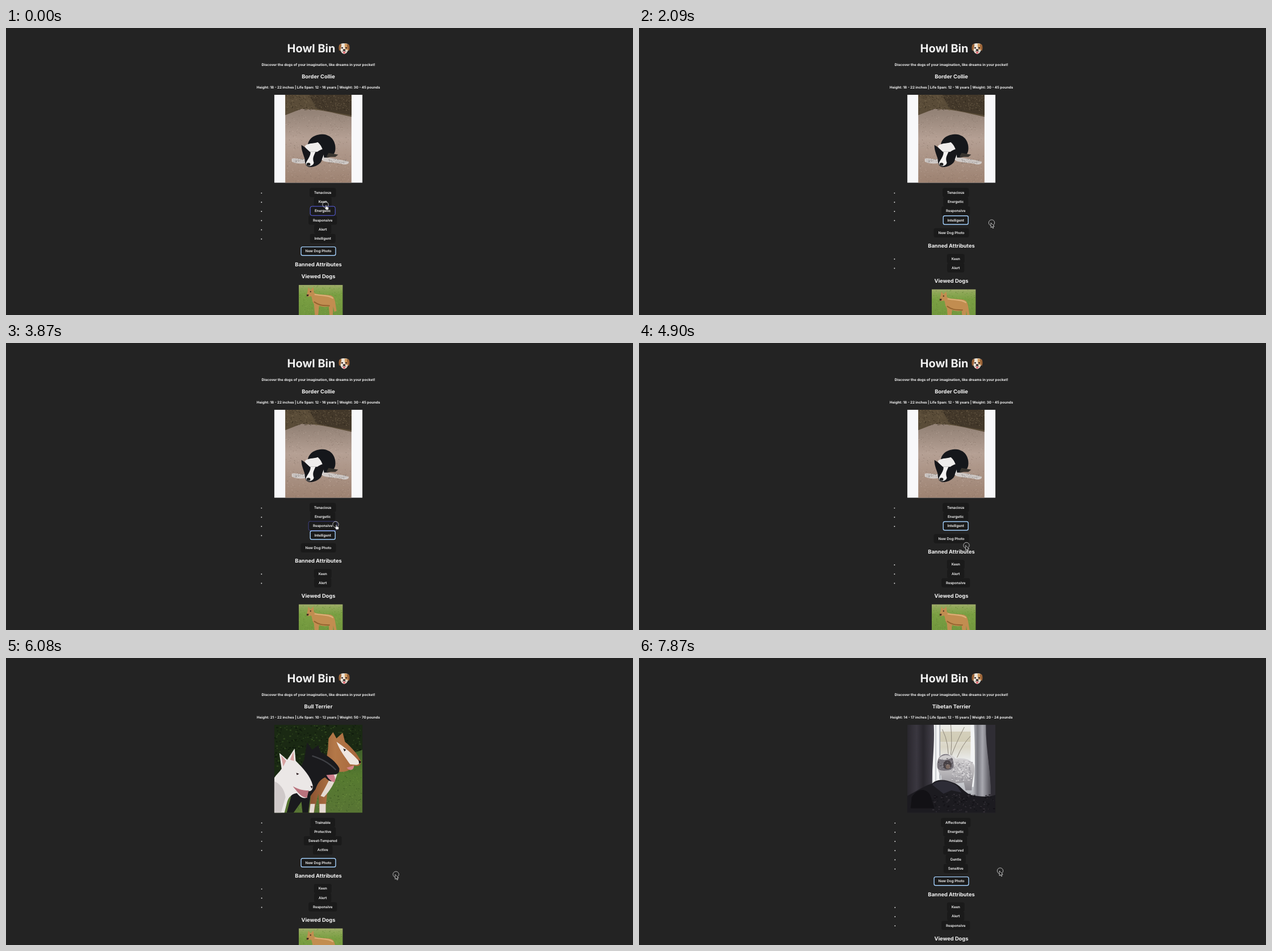
Animation, 1105 px wide and 507 px high, one loop 8000 ms. Source, as an HTML page:

```html
<!DOCTYPE html>
<html lang="en">
<head>
<meta charset="utf-8">
<title>Howl Bin</title>
<style>
  html, body { margin: 0; width: 100%; height: 100%; overflow: hidden; background: #232323; }
  svg { display: block; }
  text {
    font-family: Inter, "Open Sans", sans-serif; font-weight: 700; fill: #f3f3f3;
    text-anchor: middle; text-rendering: geometricPrecision;
  }
  .label { font-weight: 500; stroke: #f3f3f3; stroke-width: .12; }
</style>
</head>
<body>
<svg id="stage" width="1105" height="507" viewBox="0 0 1105 507">
  <defs>
    <linearGradient id="road" x2="0" y2="1">
      <stop offset=".2" stop-color="#948377"/><stop offset=".5" stop-color="#b5a094"/><stop offset="1" stop-color="#9d8271"/>
    </linearGradient>
    <linearGradient id="view" x2="0" y2="1">
      <stop stop-color="#ecece8"/><stop offset=".3" stop-color="#dad6c6"/><stop offset=".5" stop-color="#eceef0"/><stop offset="1" stop-color="#aeb0b6"/>
    </linearGradient>
    <linearGradient id="drape">
      <stop stop-color="#29272d"/><stop offset=".35" stop-color="#3a3740"/><stop offset=".6" stop-color="#28262c"/><stop offset="1" stop-color="#45424c"/>
    </linearGradient>
    <linearGradient id="sheer">
      <stop stop-color="#c9cace"/><stop offset=".3" stop-color="#77777f"/><stop offset=".55" stop-color="#a9a9b0"/><stop offset="1" stop-color="#4a4850"/>
    </linearGradient>
    <linearGradient id="coat" x2="0" y2="1">
      <stop stop-color="#dcdadb"/><stop offset=".5" stop-color="#b9b7ba"/><stop offset="1" stop-color="#8a888e"/>
    </linearGradient>
    <linearGradient id="lawn" x2="0" y2="1">
      <stop stop-color="#40602a"/><stop offset=".4" stop-color="#567a30"/><stop offset="1" stop-color="#587434"/>
    </linearGradient>
    <linearGradient id="tan">
      <stop stop-color="#8a5230"/><stop offset=".5" stop-color="#b47848"/><stop offset="1" stop-color="#a5643a"/>
    </linearGradient>
    <linearGradient id="field" x2="0" y2="1">
      <stop stop-color="#a0ab6b"/><stop offset=".12" stop-color="#8da756"/><stop offset=".3" stop-color="#7a9f43"/><stop offset="1" stop-color="#6f953c"/>
    </linearGradient>

    <symbol id="collie" viewBox="0 0 156 156">
      <rect width="156" height="156" fill="#f8f8fa"/>
      <rect x="19.5" width="117" height="156" fill="url(#road)"/>
      <g data-specks="20 36 115 119 620 #79655a #c9b5a9 .9"/>
      <path d="M19.5 0H136.5V39C112 34 92 28 70 26L48 25 19.5 36z" fill="#5a4c38"/>
      <path d="M62 0H136.5V36C112 32 88 28 74 24z" fill="#43382a"/>
      <g data-specks="20 0 115 27 380 #2a2318 #7d6d53 1.3"/>
      <path d="M59 92C59 77 72 70 86 70 101 71 109 83 108 97 107 106 102 110 94 111L66 112C60 106 59 98 59 92z" fill="#15171b"/>
      <path d="M96 103 113 106 108 110 92 110z" fill="#38342f"/>
      <path d="M54 91C60 85 68 87 77 84 85 91 88 101 88 116L64 112z" fill="#eeeceb"/>
      <path d="M86 111C100 111 121 116 131 118 134 122 126 125 118 122 106 120 95 120 86 117zM31 113C38 111 46 115 54 114L56 121C44 123 34 121 31 118z" fill="#d0cac7"/>
      <g data-specks="33 113 20 6 40 #45413f #777 .9"/>
      <g data-specks="96 114 32 7 60 #45413f #777 .9"/>
      <path d="M48 89C54 92 58 97 63 101L76 101C82 97 87 95 89 97 89 106 85 110 84 116 82 123 72 128 64 128 56 128 54 122 54 114 52 106 48 100 48 89z" fill="#16171b"/>
      <path d="M64 101 73 101C70 108 67 112 70 120 69 128 55 128 56 121 59 114 65 108 64 101z" fill="#f3f1f0"/>
      <ellipse cx="60.5" cy="123" rx="3.4" ry="2.6" fill="#222"/>
    </symbol>

    <symbol id="bull" viewBox="0 0 156 156">
      <rect width="156" height="156" fill="#1a2913"/>
      <g data-specks="0 0 152 72 420 #3a5522 #0c140a 2.4"/>
      <path d="M0 156V120L88 62C110 50 132 54 156 44V156z" fill="url(#lawn)"/>
      <g data-specks="20 62 134 92 520 #6f9240 #36521f 1.4"/>
      <path d="M95 42 96 24 104 13 110 24 121 14 125 30C137 40 148 53 153 64 154 72 148 75 140 72 133 84 121 84 112 83L104 104 94 118 90 156H80L78 122 70 156H62L66 110 92 62z" fill="url(#tan)"/>
      <path d="M110 30C122 38 140 52 151 66 150 74 140 70 134 70 126 58 116 46 110 30z" fill="#efe6e0"/>
      <path d="M104 84 112 84C108 102 98 118 88 128L82 126C90 112 96 100 104 84zM80 140H91V156H80zM64 140H72L70 156H62z" fill="#e5dad2"/>
      <path d="M128 76 141 72C141 80 134 83 128 76z" fill="#d58286"/>
      <path d="M149 62 154 66 150 69zM122 42l5 2-3 3z" fill="#1a1517"/>
      <path d="M53 62 58 31 67 44 78 36 82 48C97 56 110 66 115 77 116 86 111 88 105 88L106 98C99 103 94 97 90 93 81 97 77 103 73 114L64 126 60 156H50L48 136 34 156H22L40 88z" fill="#1a1a1d"/>
      <path d="M67 55C82 60 96 66 109 80" fill="none" stroke="#3f4045" stroke-width="2.4"/>
      <path d="M92 89 105 88Q110 98 106 102 98 100 92 89z" fill="#cf7f8c"/>
      <path d="M0 156V94C4 88 9 84 13 78L9 50 23 62 36 42 38 64C52 78 64 91 68 107 69 116 64 119 58 117L58 129C50 132 44 126 40 121 32 122 26 127 23 136L18 156z" fill="#ebe7e6"/>
      <path d="M0 100C10 104 18 114 20 128L12 156H0z" fill="#cfc9c9"/>
      <path d="M12 54 21 64 16 74zM34 47 35 64 28 62z" fill="#d8a3a3"/>
      <path d="M33 109C43 114 52 117 61 116L58 129C49 130 40 118 33 109z" fill="#b9727c"/>
      <path d="M64 108 68 109 66 113zM39 85l5 2-4 2z" fill="#29191c"/>
    </symbol>

    <symbol id="tibetan" viewBox="0 0 156 156">
      <rect width="156" height="156" fill="#2a2930"/>
      <rect x="44" width="76" height="130" fill="url(#view)"/>
      <path d="M58 12H113V30H58z" fill="#c9c1a6" opacity=".6"/>
      <path d="M72 66Q75 34 62 8M74 66Q84 36 101 4M76 60Q80 34 77 0M88 58Q98 34 112 20" fill="none" stroke="#8d867b" stroke-width="1"/>
      <path d="M45 0H58V104H45zM112 0H119V110H112z" fill="#f3f4f5"/>
      <path d="M50 0H51V104H50zM57 0H58.5V96H57z" fill="#9b9fa6"/>
      <path d="M0 0H47C49 42 42 82 44 128H0z" fill="url(#drape)"/>
      <path d="M118 0H142C138 46 150 90 148 132H114C122 92 120 42 118 0z" fill="url(#sheer)"/>
      <path d="M139 0H156V134H148C150 90 138 44 139 0z" fill="#2f2d34"/>
      <path d="M54 62C56 54 64 50 72 52 79 53 83 57 85 60 98 58 112 60 118 71 121 84 115 94 114 116H103L100 102C90 104 84 104 78 102L77 116H64L60 90C54 84 52 72 54 62z" fill="url(#coat)"/>
      <g data-specks="78 63 36 36 160 #8a888f #efedee 2"/>
      <path d="M53 74C52 59 60 51 70 52 79 54 83 64 82 75 78 80 74 81 68 81 60 82 53 80 53 74z" fill="#77737a"/>
      <path d="M56 60C60 53 74 51 79 58 74 62 64 64 56 60z" fill="#cdcbcc"/>
      <ellipse cx="71" cy="71" rx="7.5" ry="8" fill="#494246"/>
      <ellipse cx="72" cy="74" rx="4" ry="4" fill="#7d6a62"/>
      <g data-specks="54 58 25 22 50 #3a363c #a5a2a6 1.6"/>
      <path d="M0 126C16 118 30 108 44 104 54 94 70 98 80 102 94 106 98 118 112 124 130 128 146 128 156 124V156H0z" fill="#1c1b20"/>
      <path d="M44 106C56 96 74 98 88 108L96 120 78 116 64 122z" fill="#2d2c36"/>
      <path d="M8 128C20 110 36 112 42 128L48 148H6z" fill="#121115"/>
      <g data-specks="44 122 108 32 130 #3c3840 #100f13 2.4"/>
    </symbol>

    <symbol id="viewed" viewBox="0 0 78 58">
      <rect width="78" height="58" fill="url(#field)"/>
      <g data-specks="0 1 76 56 420 #8fb452 #5a7f30 1"/>
      <path d="M14 20 16 10 17 4 21 9 26 4 27 14C33 18 44 17 54 18 62 19 64 25 65 34L67 46 63 48 61 38 60 58H55L53 38C46 40 40 38 36 37L34 58H29L27 34C23 28 24 22 22 20L16 21z" fill="#c28d50"/>
      <path d="M28 17C40 19 54 18 61 24" fill="none" stroke="#dcb078" stroke-width="2"/>
      <path d="M27 30C38 38 46 36 55 37" fill="none" stroke="#94642f" stroke-width="2"/>
      <path d="M14 17h4l-1 3h-3zM20 11h2v2h-2z" fill="#3a2a1d"/>
    </symbol>

    <g id="pup">
      <path d="M-9-7Q-5-11 0-10 5-11 9-7 8 9 0 10-8 9-9-7z" fill="#eee6da"/>
      <path d="M1-10Q8-10 8-2 7 4 3 2 0-3 1-10z" fill="#d39c60"/>
      <path d="M-6-9C-11-9-11 0-9 4-6 4-6-3-5-8zM6-9C11-9 11 0 9 4 6 4 6-3 5-8z" fill="#9b6438"/>
      <circle cx="-3.8" cy="-1.5" r="1.5" fill="#2c2020"/><circle cx="3.8" cy="-1.5" r="1.5" fill="#2c2020"/>
      <path d="M-2 5.5H2V8Q0 11-2 8z" fill="#e2606d"/>
      <ellipse cy="2.6" rx="2.7" ry="1.9" fill="#2b2224"/>
      <path d="M-4.5 5Q-2 7 0 4.5 2 7 4.5 5" fill="none" stroke="#6a5147" stroke-width=".8"/>
    </g>
  </defs>

  <text x="538" y="43.2" font-size="19.91">Howl Bin</text>
  <use href="#pup" transform="translate(596 36.6) scale(.93)"/>
  <g id="pages"></g>
  <rect id="glow" rx="3.1" fill="none" stroke="#646cff" stroke-width=".9"/>
  <g id="pointer">
    <circle r="5.2" fill="none" stroke="#d8d8d8" stroke-width=".8"/>
    <path id="arrow" d="M-1.3 .2V8.6L.7 6.8 2 9.8 3.4 9.2 2.1 6.3H4.7z" fill="#111" stroke="#fff" stroke-width=".7"/>
    <path id="hand" d="M.2 1Q1.3 .3 1.8 1.4V3.8L5 4.6Q5.8 5 5.5 6.3L4.8 9H1L-1.2 6Q-1 4.9 .2 5.6z" fill="#fff" stroke="#222" stroke-width=".5"/>
  </g>
</svg>
<script>
const LOOP = 8000, MID = 550.5, LIST_X = 558.2, PITCH = 16.22, EM = 6.222;
const PHOTO = "New Dog Photo";
const $ = id => document.getElementById(id);

function add(parent, tag, attrs, text) {
  const node = document.createElementNS("http://www.w3.org/2000/svg", tag);
  for (const key in attrs) node.setAttribute(key, attrs[key]);
  if (text) node.textContent = text;
  return parent.appendChild(node);
}

// Seeded texture: x y w h count colourA colourB size
let seed = 7;
const rand = () => (seed = seed * 16807 % 2147483647) / 2147483647;
document.querySelectorAll("[data-specks]").forEach(g => {
  const [x, y, w, h, n, a, b, r] = g.dataset.specks.split(" ");
  const paths = [a, b].map(fill => ({ fill, d: "" }));
  for (let i = 0; i < n; i++) {
    const size = r * (0.5 + rand());
    paths[i % 2].d += `M${(+x + rand() * w).toFixed(1)} ${(+y + rand() * h).toFixed(1)}h${size.toFixed(1)}v${(size * .7).toFixed(1)}h-${size.toFixed(1)}z`;
  }
  paths.forEach(p => add(g, "path", { ...p, opacity: .65 }));
});

const dogs = {
  collie: { name: "Border Collie", stats: ["18 - 22", "12 - 16", "30 - 45"], bullet: 450.3,
    traits: "Tenacious Keen Energetic Responsive Alert Intelligent" },
  bull: { name: "Bull Terrier", stats: ["21 - 22", "10 - 12", "50 - 70"], bullet: 450.6,
    traits: "Trainable Protective Sweet-Tempered Active" },
  tibetan: { name: "Tibetan Terrier", stats: ["14 - 17", "12 - 15", "20 - 24"], bullet: 451.2,
    traits: "Affectionate Energetic Amiable Reserved Gentle Sensitive" }
};

// time, dog, picture, banned traits, focused button
const pages = [
  [0, "collie", "collie", [], PHOTO],
  [300, "collie", "collie", ["Keen"], "Energetic"],
  [1800, "collie", "collie", ["Keen", "Alert"], "Intelligent"],
  [4160, "collie", "collie", ["Keen", "Alert", "Responsive"], "Intelligent"],
  [5200, "collie", "collie", ["Keen", "Alert", "Responsive"], PHOTO],
  [5780, "bull", "collie", ["Keen", "Alert", "Responsive"], PHOTO],
  [6080, "bull", "bull", ["Keen", "Alert", "Responsive"], PHOTO],
  [7870, "tibetan", "tibetan", ["Keen", "Alert", "Responsive"], PHOTO]
];

// time, x, y, hovered button, border strength; a hovered button shows the hand
const moves = [
  [0, 563, 312, "Energetic", 1], [150, 561.5, 309.5, "Keen", 1], [300, 562, 309.5, "Energetic", 0],
  [450, 568, 312, "Energetic", 0], [600, 622, 346], [750, 692, 391], [900, 736.5, 413], [1050, 734, 414],
  [1200, 747, 415], [1350, 722, 405], [1500, 648, 370], [1650, 574, 342, "Alert", .5], [1800, 563, 340, "Intelligent", 0],
  [1940, 603, 346], [2090, 621.5, 344], [2240, 601, 337],
  [2390, 592, 329], [2540, 583, 321], [2690, 579.5, 318, "Responsive", .5], [2840, 579, 316.5, "Responsive", 1],
  [2990, 580, 315.5, "Responsive", 1], [3130, 580.5, 315.5, "Responsive", 1],
  [3430, 589, 318, "Responsive", .4], [3580, 595, 322], [3730, 590, 322], [3870, 581, 320.5, "Responsive", .5],
  [4020, 573, 321, "Responsive", 1], [4160, 572, 322, "Intelligent", 0], [4310, 594, 337], [4460, 613, 352],
  [4610, 611, 361], [4750, 597, 362], [4900, 577, 357.5], [5050, 566, 349, PHOTO, .6], [5200, 566, 347, PHOTO, 0],
  [5350, 603, 361], [5500, 668, 384], [5640, 687.2, 382.3],
  [6230, 669, 380], [6380, 628, 371], [6530, 590, 364], [6680, 573, 361, PHOTO, 0], [6830, 570, 359, PHOTO, 0],
  [6980, 569.5, 357, PHOTO, 0], [7130, 571, 358, PHOTO, 0], [7280, 598, 367], [7430, 640, 379], [7580, 660, 383],
  [7870, 636.5, 376]
];

// Text whose capitals are centred on y
const write = (g, x, y, size, text, cls = "") =>
  add(g, "text", { x, y: y + size * .3636, "font-size": size, class: cls }, text);

function button(page, label, x, y) {
  const text = write(page.g, x, y, EM, label, "label");
  const w = text.getComputedTextLength() + 2.54 * EM, h = 16.2;
  const box = { x: x - w / 2, y: y - h / 2, width: w, height: h };
  const rect = add(page.g, "rect", { ...box, rx: 3.1, fill: "#1a1a1a" });
  page.g.insertBefore(rect, text);
  page.boxes[label] = box;
}

function list(page, labels, y, bullet) {
  labels.forEach((label, i) => {
    add(page.g, "circle", { cx: bullet, cy: y + i * PITCH + .9, r: .95, fill: "#e4e4e4" });
    button(page, label, LIST_X, y + i * PITCH);
  });
}

function ring(page, label) {
  const { x, y, width, height } = page.boxes[label], inset = .5;
  add(page.g, "rect", {
    x: x + inset, y: y + inset, width: width - 2 * inset, height: height - 2 * inset,
    rx: 2.8, fill: "none", stroke: "#a3cffb", "stroke-width": 1.4
  });
}

function build([time, id, picture, banned, focus]) {
  const page = { time, g: add($("pages"), "g", {}), boxes: {} };
  const { g } = page, dog = dogs[id], [tall, life, heavy] = dog.stats;
  const traits = dog.traits.split(" ").filter(t => !banned.includes(t));
  write(g, MID, 65, EM, "Discover the dogs of your imagination, like dreams in your pocket!");
  write(g, MID, 85.4, EM * 1.5, dog.name);
  write(g, MID, 104.6, EM, `Height: ${tall} inches | Life Span: ${life} years | Weight: ${heavy} pounds`);
  add(g, "use", { href: "#" + picture, x: 472.7, y: 118, width: 155.6, height: 155.6 });

  const top = picture === "bull" ? 290.5 : 290.7;
  list(page, traits, top, dog.bullet);
  const photoY = top + traits.length * PITCH + 6.2, bannedY = photoY + 23.1;
  button(page, PHOTO, MID, photoY);
  write(g, MID, bannedY, EM * 1.5, "Banned Attributes");
  list(page, banned, bannedY + 22.5, dog.bullet);
  const viewedY = bannedY + (banned.length ? banned.length * PITCH + 29.3 : 21.6);
  write(g, MID, viewedY, EM * 1.5, "Viewed Dogs");
  add(g, "use", { href: "#viewed", x: 515.8, y: viewedY + 14.8, width: 77.8, height: 57.9 });
  ring(page, focus);
  return page;
}

const built = pages.map(build);
const show = (node, on) => node.style.display = on ? "" : "none";
const start = performance.now();

function draw() {
  const t = (performance.now() - start) % LOOP;
  const page = built.findLast(p => p.time <= t);
  built.forEach(p => show(p.g, p === page));

  const [, x, y, hover, strength] = moves.findLast(m => m[0] <= t);
  $("pointer").setAttribute("transform", `translate(${x} ${y})`);
  show($("hand"), hover);
  show($("arrow"), !hover);

  const box = page.boxes[hover];
  show($("glow"), box && strength);
  if (box) {
    for (const key in box) $("glow").setAttribute(key, box[key]);
    $("glow").setAttribute("opacity", strength);
  }
  requestAnimationFrame(draw);
}
draw();
</script>
</body>
</html>
```
